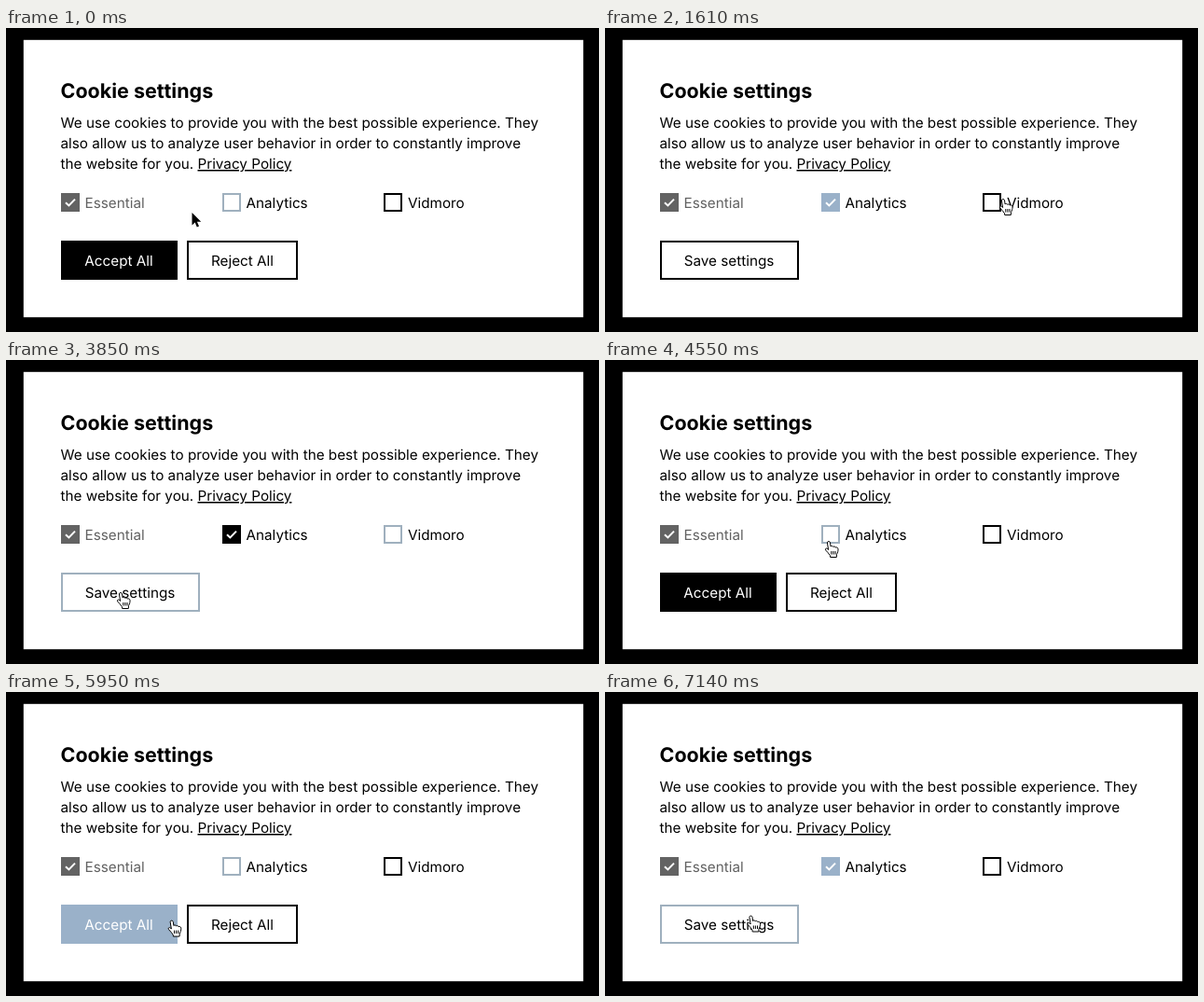
An HTML page that plays this animation: 636 by 326 pixels, repeating every 7490 ms.

```html
<!DOCTYPE html>
<html lang="en">
<head>
<meta charset="utf-8">
<title>Cookie settings</title>
<style>
  html, body { margin: 0; width: 100%; height: 100%; overflow: hidden; background: #000; }
  svg { display: block; width: 636px; height: 326px; --blue: #9ab1c9; --edge: #9fb0be; }
  text { font: 15.27px Inter, "Open Sans", sans-serif; text-rendering: geometricPrecision; }
  .title { font-size: 21.5px; font-weight: 700; }
  .link { text-decoration: underline; text-underline-offset: 1.5px; text-decoration-thickness: 1.2px; }
  .box rect, .button rect { fill: #fff; stroke: #000; stroke-width: 2; }
  .box path { fill: none; stroke: #fff; stroke-width: 2; visibility: hidden; }
  .checked rect { fill: #000; }
  .checked path { visibility: visible; }
  .focus rect, .hover rect { stroke: var(--edge); }
  .checked.focus rect { fill: var(--blue); stroke: var(--blue); }
  .disabled rect { fill: #636363; stroke: #636363; }
  .disabled text { fill: #626262; }
  .primary rect { fill: #000; }
  .primary text { fill: #fff; }
  .primary.hover rect { fill: var(--blue); stroke: var(--blue); }
  .hidden { display: none; }
  #ring { fill: none; stroke: #000; stroke-width: 1.5; }
  #arrow { fill: #000; stroke: #fff; stroke-width: 1; paint-order: stroke; }
  #hand { fill: #fff; stroke: #000; stroke-width: 1; stroke-linejoin: round; }
</style>
</head>
<body>
<svg viewBox="0 0 636 326">
  <rect x="18.8" y="12.8" width="600.4" height="297.4" fill="#fff"/>
  <text class="title" x="58.5" y="75">Cookie settings</text>
  <text x="58.5" y="107">We use cookies to provide you with the best possible experience. They</text>
  <text x="58.5" y="129">also allow us to analyze user behavior in order to constantly improve</text>
  <text x="58.5" y="151">the website for you.</text>
  <text class="link" x="205.5" y="151">Privacy Policy</text>

  <g id="essential" class="box checked disabled" transform="translate(59 177)">
    <rect x="1" y="1" width="18" height="18"/><path d="M5 10.2 8.4 13.4 15 6.6"/>
    <text x="25.5" y="16">Essential</text>
  </g>
  <g id="analytics" class="box" transform="translate(232 177)">
    <rect x="1" y="1" width="18" height="18"/><path d="M5 10.2 8.4 13.4 15 6.6"/>
    <text x="25.5" y="16">Analytics</text>
  </g>
  <g id="video" class="box" transform="translate(405 177)">
    <rect x="1" y="1" width="18" height="18"/><path d="M5 10.2 8.4 13.4 15 6.6"/>
    <text x="26" y="16">Vidmoro</text>
  </g>

  <g id="accept" class="button primary">
    <rect x="60" y="229" width="123" height="40"/>
    <text x="121" y="255" text-anchor="middle">Accept All</text>
  </g>
  <g id="reject" class="button">
    <rect x="195" y="229" width="117" height="40"/>
    <text x="253.5" y="255" text-anchor="middle">Reject All</text>
  </g>
  <g id="save" class="button">
    <rect x="60" y="229" width="147" height="40"/>
    <text x="133" y="255" text-anchor="middle">Save settings</text>
  </g>

  <g id="cursor">
    <circle id="ring" r="30.7"/>
    <path id="arrow" d="M.5 .5V14L3.7 11.1 5.8 16 8 15.1 5.9 10.3H10.2Z"/>
    <path id="hand" transform="translate(-1 0)" d="M-1.6 1.9C-1.6 .1 1.3 .1 1.5 1.8L2.1 6C2.7 5 4.4 5.2 4.7 6.4 5.4 5.6 7 5.9 7.3 7.1 8.3 6.5 9.8 7 10 8.6 10.2 11 9.4 12.6 8.5 14.5L8.3 17.5H1.7L1.4 15.6C0 13.6-1.6 11.7-3.2 10.1-4.4 8.6-2.6 7.2-1.2 8.6L-.4 9.5ZM2.8 11V14.5M4.9 11V14.5M7 11V14.5"/>
  </g>
</svg>
<script>
  const LOOP = 7490, STEP = 70;
  const START = [199, 197.5];

  // Pointer moves: begin, end, x, y
  const moves = [
    [350, 910, 243, 191],
    [1190, 1610, 428, 183], [1610, 1820, 424.5, 186],
    [2870, 3430, 125, 251], [3780, 3850, 124, 249],
    [3990, 4340, 241, 194],
    [4620, 4970, 185, 253], [5180, 5250, 174, 252], [5250, 5390, 165, 256],
    [5810, 6370, 253, 183], [6370, 6440, 253, 184],
    [6720, 7140, 157.5, 239.5]
  ];

  // Clicks: press, release, checkbox
  const clicks = [
    [980, 1050, 'analytics'], [1820, 1960, 'video'], [2590, 2660, 'video'],
    [4480, 4550, 'analytics'], [6370, 6510, 'analytics']
  ];

  // Clickable areas: left, top, right, bottom
  const areas = {
    analytics: [232, 177, 324, 198],
    video: [405, 177, 494, 198],
    link: [206, 137, 306, 156],
    accept: [59, 228, 184, 270],
    reject: [194, 228, 313, 270],
    save: [59, 228, 208, 270]
  };

  const $ = id => document.getElementById(id);
  const toggle = (id, name, on) => $(id).classList.toggle(name, on);
  const ease = p => p * p * (3 - 2 * p);

  function pointerAt(t) {
    let [x, y] = START;
    for (const [begin, end, toX, toY] of moves) {
      if (t <= begin) break;
      const p = ease(Math.min(1, (t - begin) / (end - begin)));
      x += (toX - x) * p;
      y += (toY - y) * p;
    }
    return [x, y];
  }

  function formAt(t) {
    const form = { checked: { analytics: false, video: false }, focus: 'analytics', pressed: false };
    for (const [down, up, id] of clicks) {
      if (t < down) break;
      form.pressed = t < up;
      form.focus = form.pressed ? null : id;
      if (!form.pressed) form.checked[id] = !form.checked[id];
    }
    return form;
  }

  function draw(t) {
    const [x, y] = pointerAt(t);
    const { checked, focus, pressed } = formAt(t);
    const custom = checked.analytics || checked.video;
    const over = id => {
      const [l, top, r, b] = areas[id];
      return x >= l && x < r && y >= top && y < b;
    };

    for (const id of ['analytics', 'video']) {
      toggle(id, 'checked', checked[id]);
      toggle(id, 'focus', focus === id);
    }
    const visible = custom ? ['save'] : ['accept', 'reject'];
    for (const id of ['accept', 'reject', 'save']) {
      toggle(id, 'hidden', !visible.includes(id));
      toggle(id, 'hover', over(id));
    }

    const clickable = ['analytics', 'video', 'link', ...visible].some(over);
    toggle('hand', 'hidden', !clickable);
    toggle('arrow', 'hidden', clickable);
    toggle('ring', 'hidden', !pressed);
    $('cursor').setAttribute('transform', `translate(${x} ${y})`);
  }

  const begin = performance.now();
  function tick() {
    const t = (performance.now() - begin) % LOOP;
    draw(Math.floor(t / STEP) * STEP);
    requestAnimationFrame(tick);
  }
  tick();
</script>
</body>
</html>
```
